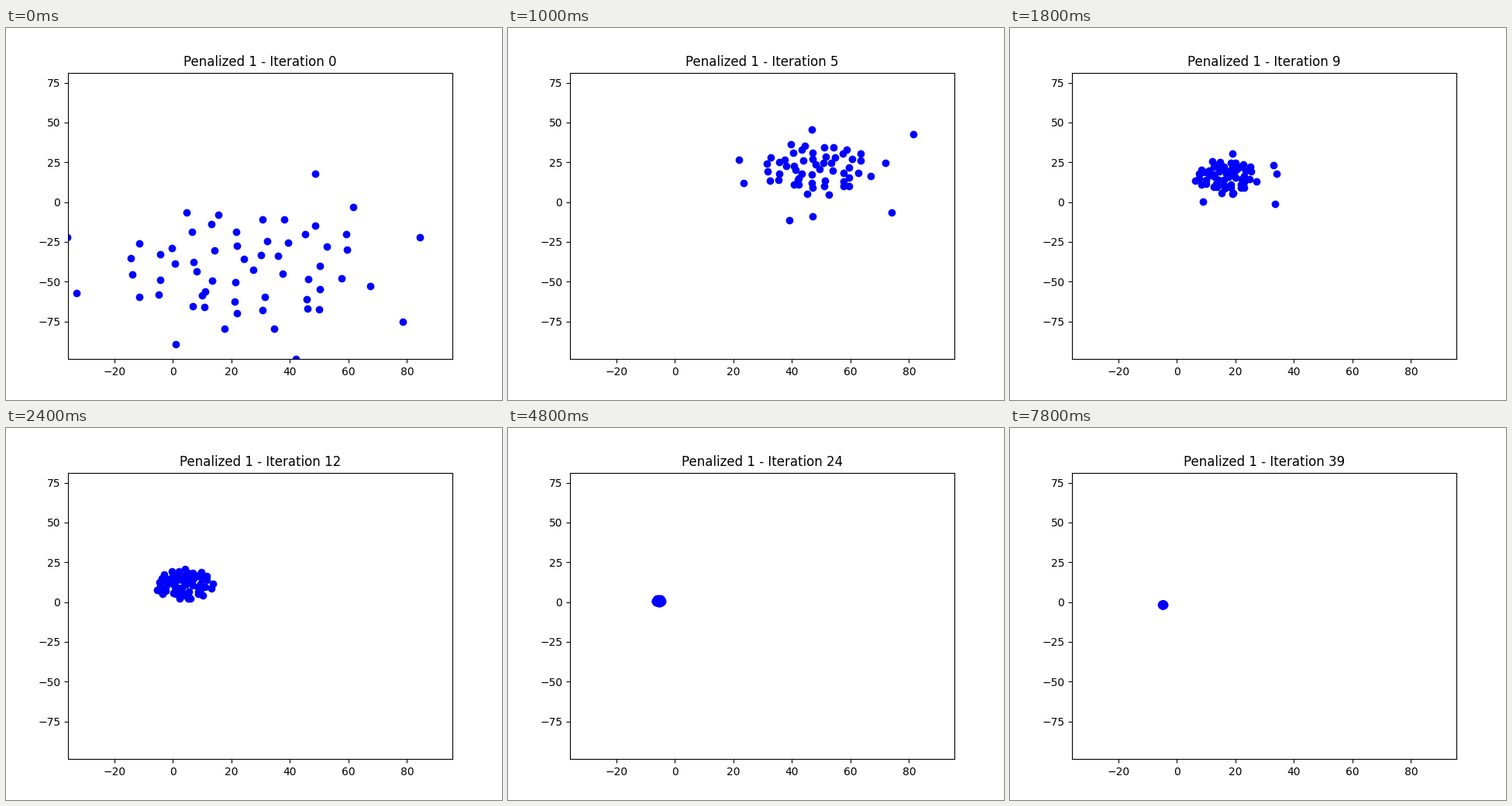
These frames come from a looping animation (640x480 px, 8000 ms). A matplotlib script:

```python
import numpy as np
import matplotlib.pyplot as plt
from matplotlib.animation import FuncAnimation

COUNT = 60
GOLDEN = np.pi * (3 - 5 ** 0.5)

# iteration: centre, radii, stray points
KEYS = {
    0: ((25, -42), (46, 42),
        [(-36, -22), (1, -89.5), (42, -98.7), (48.5, 18), (61.7, -3),
         (78.5, -75), (-33, -57), (84.5, -22)]),
    5: ((48.5, 21), (20, 18),
        [(22, 26.5), (39, -11.5), (47, -9), (46.7, 45.5), (72, 24.5),
         (74, -6.5), (23.5, 12), (81.5, 42.5)]),
    9: ((17, 16), (11, 11.5),
        [(6.3, 13.2), (9, 0.2), (19, 5.3), (19, 30.5), (34, 18),
         (33.6, -1), (8.7, 19), (33, 23)]),
    12: ((4, 11), (10, 10), []),
    14: ((-3.5, 8.3), (6.7, 7), []),
    17: ((-3.6, 5.8), (3, 3.8), [(-7.8, 1.1), (3.3, 9)]),
    24: ((-5.5, 0.7), (1.3, 1.7), []),
    32: ((-4.85, -0.9), (0.65, 0.85), []),
    39: ((-4.85, -1.6), (0.45, 0.65), []),
}
STEPS = sorted(KEYS)


def make_cloud():
    """Jittered sunflower pattern filling the unit disc."""
    rng = np.random.default_rng(4)
    i = np.arange(COUNT)
    r = np.sqrt((i + 0.5) / COUNT)
    disc = np.column_stack([np.cos(i * GOLDEN), np.sin(i * GOLDEN)])
    return disc * r[:, None] + rng.normal(0, 0.06, (COUNT, 2))


def pose(centre, radii, strays):
    pts = np.array(centre) + cloud * radii
    if strays:
        pts[-len(strays):] = strays
    return pts


cloud = make_cloud()
poses = {it: pose(*key) for it, key in KEYS.items()}


def swarm(it):
    k = min(np.searchsorted(STEPS, it, side="right"), len(STEPS) - 1)
    a, b = STEPS[k - 1], STEPS[k]
    u = (it - a) / (b - a)
    shift = 0
    if a == 0:  # the first flight overshoots
        shift = np.array([7.5, 17.5]) * np.sin(np.pi * u)
        u = 1 - (1 - u) ** 2
    return poses[a] + (poses[b] - poses[a]) * u + shift


fig, ax = plt.subplots(figsize=(6.4, 4.8), dpi=100)
ax.set_xlim(-35.86, 95.51)
ax.set_ylim(-98.7, 81.3)
ax.set_yticks(range(-75, 76, 25))
dots = ax.scatter(*swarm(0).T, c="blue")
title = ax.set_title("")


def draw(it):
    dots.set_offsets(swarm(it))
    title.set_text(f"Penalized 1 - Iteration {it}")
    return dots, title


anim = FuncAnimation(fig, draw, frames=40, init_func=lambda: draw(0),
                     interval=200, repeat=True, repeat_delay=0)
plt.show()
```
